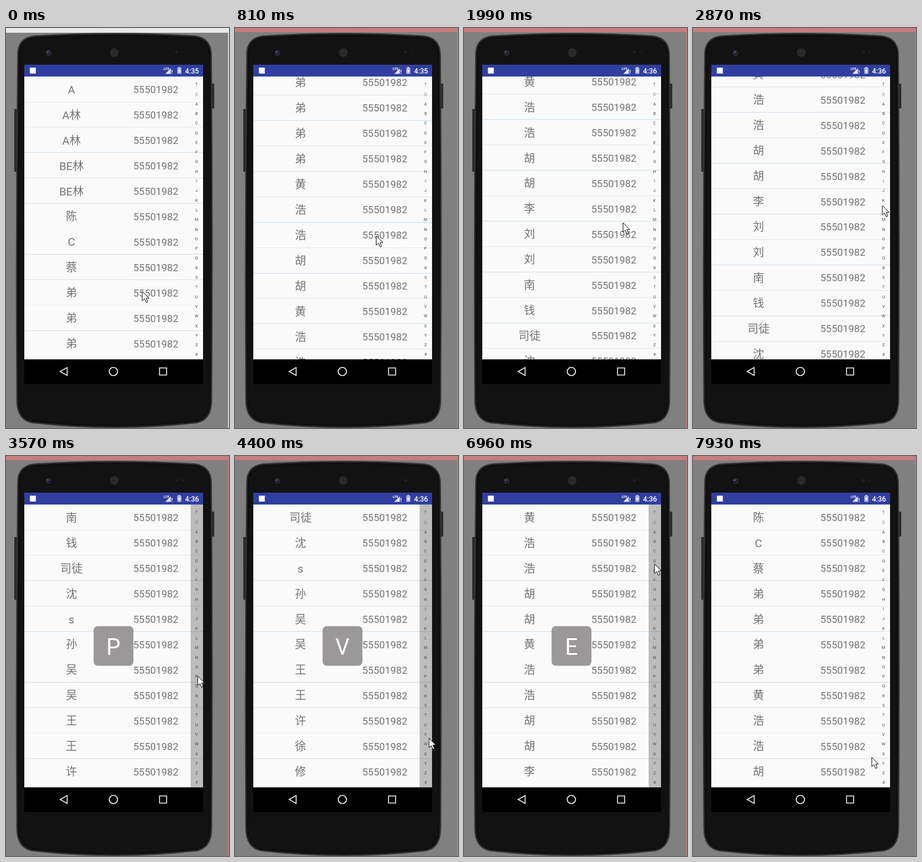
Recreate the animation shown at these times as an HTML page with a canvas. Size 378 by 676 pixels, loop 8 s.

```html
<!DOCTYPE html>
<html lang="zh-CN">
<head>
<meta charset="utf-8">
<style>
html, body { margin: 0; width: 100%; height: 100%; overflow: hidden; background: #808080; }
canvas { display: block; }
</style>
</head>
<body>
<canvas id="stage" width="378" height="676"></canvas>
<script>
const ctx = document.getElementById('stage').getContext('2d');
const LOOP = 8000, ROW = 42.95, TOP = 82, BOTTOM = 560;
const SANS = 'Roboto, "Noto Sans CJK SC", "Noto Sans CJK", sans-serif';
const PHONE = '55501982';
const names = ('A A林 A林 BE林 BE林 陈 C 蔡 弟 弟 弟 弟 黄 浩 浩 胡 胡 黄 浩 浩 胡 胡 李 ' +
  '刘 刘 南 钱 司徒 沈 s 孙 吴 吴 王 王 许 徐 修').split(' ');
const letters = [...'↑☆ABCDEFGHIJKLMNOPQRSTUVWXYZ#'];
const sections = [['C', 5], ['D', 8], ['H', 12], ['L', 22], ['N', 25], ['Q', 26], ['S', 27]];

// The screen refreshes in bursts: start, end, number of steps
const bursts = [[270, 1210, 8], [1360, 2350, 9], [2600, 3570, 8], [3720, 4670, 8],
  [4820, 5790, 8], [5910, 6810, 7], [6960, 7200, 3], [7510, 7930, 4]];
const ticks = [0];
for (const [a, b, n] of bursts)
  for (let i = 0; i < n; i++) ticks.push(a + (b - a) * i / (n - 1));

// Pointer tip: time, x, y
const path = [[0, 231, 445], [270, 231, 445], [700, 239, 352], [1360, 241, 346], [1700, 243, 344],
  [2350, 305, 309], [2870, 321, 300], [3000, 321, 300], [3570, 325, 372], [4400, 329, 477],
  [4650, 331, 474], [5370, 338, 401], [5800, 342, 348], [6810, 325, 198], [6960, 323, 182.5],
  [7200, 322, 158], [7510, 322, 158], [7930, 303, 509]];
const PRESS = 2950, TURN = 4600, RELEASE = 7505;
const slotLines = ['', '#e6ebee', '#cfe0ef', '#e0e4e8', '#cfe0ef', '', '#cfe0ef', '#dfe1e3', '#eaf0f5', '#dfe1e3', ''];

function pointer(t) {
  const i = Math.max(1, path.findIndex(p => p[0] >= t));
  const [t0, x0, y0] = path[i - 1], [t1, x1, y1] = path[i];
  const u = Math.min(1, Math.max(0, (t - t0) / (t1 - t0)));
  return [x0 + (x1 - x0) * u, y0 + (y1 - y0) * u];
}

const letterAt = y => letters[Math.floor((y - TOP) * letters.length / (BOTTOM - TOP))];

function scrollAt(t, letter) {
  if (t < PRESS) {
    const u = Math.min(1, Math.max(0, (t - 350) / 2000));
    return 755.4 * (1 - (1 - u) ** 2.448);
  }
  const hit = t < TURN
    ? sections.filter(s => s[0] <= letter).pop()
    : sections.find(s => s[0] >= letter) || sections[sections.length - 1];
  return hit[1] * ROW;
}

function rect(x, y, w, h, fill, r = 0) {
  ctx.fillStyle = fill;
  ctx.beginPath();
  ctx.roundRect(x, y, w, h, r);
  ctx.fill();
}

function disc(x, y, r, fill) {
  ctx.fillStyle = fill;
  ctx.beginPath();
  ctx.arc(x, y, r, 0, 7);
  ctx.fill();
}

function shape(d, fill, stroke, width = 1) {
  const p = new Path2D(d);
  if (fill) { ctx.fillStyle = fill; ctx.fill(p); }
  if (stroke) { ctx.strokeStyle = stroke; ctx.lineWidth = width; ctx.stroke(p); }
}

function text(s, x, y, size, fill, align = 'center', weight = 400) {
  ctx.font = `${weight} ${size}px ${SANS}`;
  ctx.textAlign = align;
  ctx.fillStyle = fill;
  ctx.fillText(s, x, y);
}

function drawPhone(t) {
  const frame = t < 270 ? '#e9e9ea' : '#c97c7c';
  rect(0, 0, 378, 676, frame);
  rect(0, t < 270 ? 8 : 7, 376.5, 669, '#808080');
  rect(14, 137, 5, 106, '#2b2b2b', 1);
  rect(348, 94, 5, 42, '#2b2b2b', 1);
  shape('M20 44Q20 17 48 13.5Q184 5 320 13.5Q347 17 348 44Q350.5 340 348.5 630Q348 662 324 667Q184 683 44 667Q19 662 18.5 630Q16.5 340 20 44Z',
    '#141414', '#353535', 2);
  shape('M23 44Q23 21 49 17Q184 9 319 17Q344 21 345 44Q347 340 345 630Q344 658 322 664Q184 679 46 664Q23 658 22 630Q20 340 23 44Z',
    '#121212', '#0a0a0a', 1);
  disc(72, 42, 4.5, '#3c3d42');
  disc(72, 42, 3.2, '#14182c');
  disc(71, 41, 1.4, '#5866a0');
  disc(183.5, 41.5, 7.5, '#333');
  for (let y = -6; y <= 6; y += 3)
    for (let x = -6; x <= 6; x += 3)
      if (x * x + y * y < 50) disc(183.5 + x, 41.5 + y, 0.9, '#151515');
  disc(289, 41, 2.5, '#202020');
  disc(299, 41, 1.8, '#1d1d1d');
}

function drawBars(t) {
  rect(31, 62, 303, 20, '#303f9f');
  rect(40.5, 67, 10, 10, '#fff');
  text('LTE', 272, 71, 6, '#fff', 'center', 700);
  shape('M270 77.5H279.5V68Z', '#dfe3f5');
  text('!', 281.5, 77.5, 9, '#fff', 'center', 700);
  rect(292.3, 66, 3, 2, '#fff');
  rect(290.3, 67, 7, 10.5, '#aab2dc', 1);
  shape('M294.5 68.5L291.5 73H293.5L293 76.5L296.3 71.8H294.2Z', '#fff');
  text(t < 1900 ? '4:35' : '4:36', 315.3, 76.5, 12, '#fff', 'center', 500);

  rect(31, BOTTOM, 303, 42, '#000');
  shape('M91.8 580.5L103.6 573.8V587.2Z', null, '#ececec', 1.6);
  shape('M175 580.5a7 7 0 1 0 14 0a7 7 0 1 0 -14 0Z', null, '#ececec', 1.7);
  shape('M260.3 574.5h12v12h-12Z', null, '#ececec', 1.6);
}

function drawList(scroll, pressed, letter) {
  ctx.save();
  ctx.beginPath();
  ctx.rect(31, TOP, 303, BOTTOM - TOP);
  ctx.clip();
  rect(31, TOP, 303, BOTTOM - TOP, '#fafafa');
  const offset = scroll % ROW;
  const aligned = offset < 0.1 || ROW - offset < 0.1;
  names.forEach((name, i) => {
    const mid = 104 + i * ROW - scroll;
    if (mid < 50 || mid > 600) return;
    const line = Math.floor(mid + 21);
    const slot = Math.floor((line - TOP) / 43);
    const colour = aligned ? slotLines[slot] : slot % 2 ? '#cfe0ef' : '#e4e7ea';
    if (colour) rect(31, line, 303, 1, colour);
    text(name, 111, mid + 6.7, 19, '#737373');
    text(PHONE, 254, mid + 6, 17, '#737373');
  });
  if (pressed) rect(313, TOP, 21, BOTTOM - TOP, 'rgba(0,0,0,.25)');
  letters.forEach((c, i) => text(c, 323, 98 + i * 16.3, 6.8, '#4a4a4a'));
  if (pressed) {
    rect(148.5, 287.5, 67.5, 67, 'rgba(146,142,143,.9)', 7);
    text(letter, 182, 336, 38, '#fff');
  }
  ctx.restore();
}

function drawPointer(x, y) {
  ctx.save();
  ctx.translate(x, y);
  shape('M0 0V16L3.8 12.6L6.6 19L9.2 17.9L6.5 11.7H11.4Z', '#fff', '#111', 1);
  ctx.restore();
}

function draw(now) {
  const time = now % LOOP;
  const t = ticks.filter(k => k <= time + 10).pop();
  const [x, y] = pointer(t);
  const pressed = t >= PRESS && t < RELEASE;
  const letter = letterAt(t < RELEASE ? y : 158);
  drawPhone(t);
  drawList(scrollAt(t, letter), pressed, letter);
  drawBars(t);
  drawPointer(x, y);
  requestAnimationFrame(draw);
}
requestAnimationFrame(draw);
</script>
</body>
</html>
```
